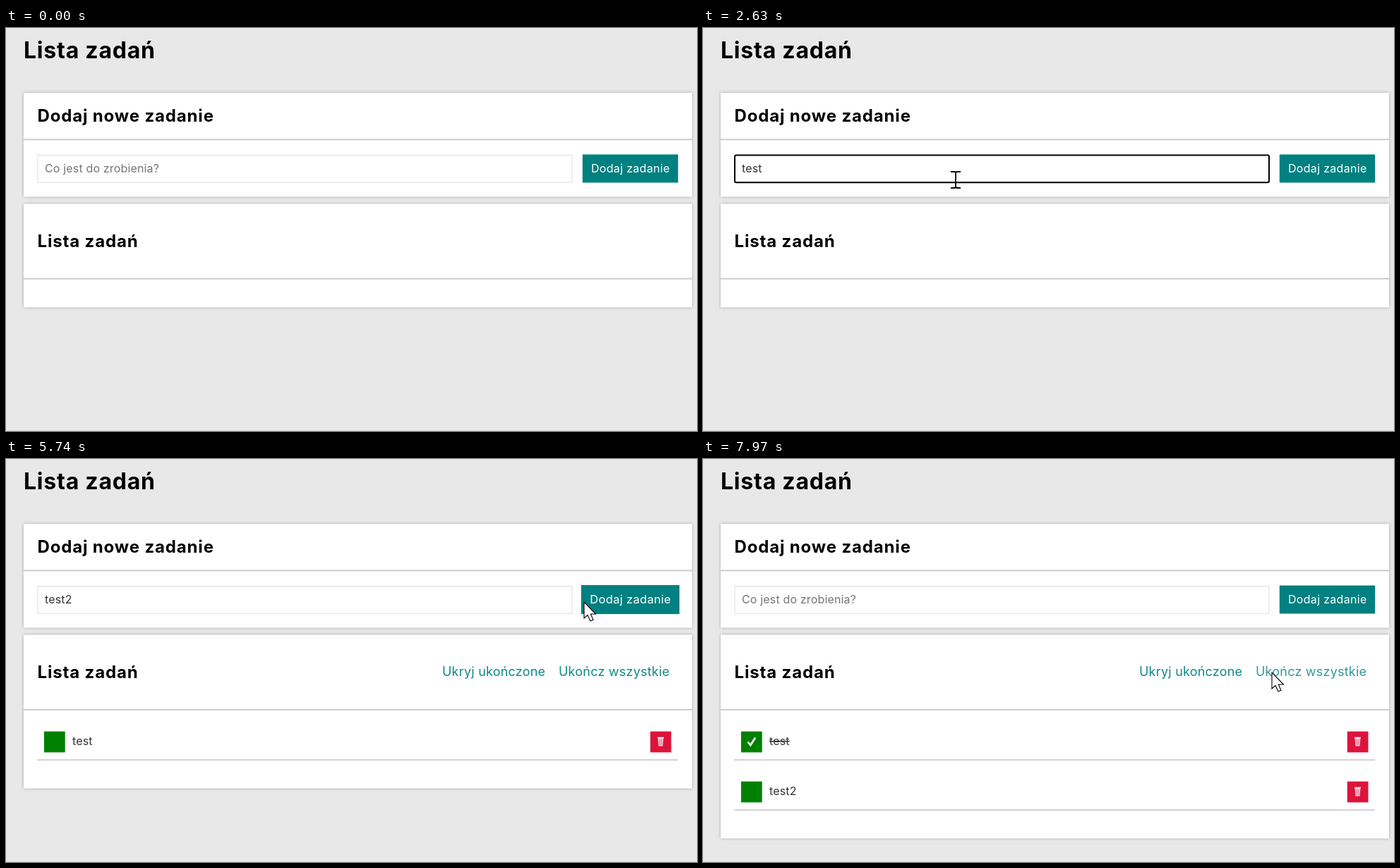
These frames come from a looping animation (979 px wide and 572 px high, 8000 ms). An HTML page:

```html
<!DOCTYPE html>
<html lang="pl">
<head>
<meta charset="utf-8">
<title>Lista zadań</title>
<style>
  html, body { margin: 0; width: 100%; height: 100%; overflow: hidden; background: #e8e8e8; }
  svg { display: block; }
  text { font: 400 16px Montserrat, Inter, sans-serif; fill: #333; letter-spacing: .01em; }
  .h1 { font-size: 32px; letter-spacing: .024em; }
  .h2 { font-size: 24px; letter-spacing: .035em; }
  .h1, .h2 { font-weight: 700; fill: #000; }
  .panel { fill: #fff; filter: drop-shadow(0 0 2px #0004); }
  .rule { fill: #ccc; }
  .link { font-size: 18px; fill: #0f8888; letter-spacing: .012em; }
  #add { transform-origin: 884.5px 199.5px; }
  #add text { fill: #fff; letter-spacing: .02em; }
  #field { fill: #fff; stroke: #ddd; }
  #field.focus { stroke: #000; stroke-width: 2px; rx: 2px; }
</style>
</head>
<body>
<svg width="979" height="572" viewBox="0 0 979 572">
  <defs>
    <g id="row">
      <rect x="54" y="386.7" width="29.7" height="29.7" fill="#008000"/>
      <rect x="912.8" y="386.7" width="29.7" height="29.7" fill="#dc143c"/>
      <path d="M923.5 396l1 11.500h6l1-11.500z" fill="#f3c5cd"/>
      <path d="M923 395.500h9" stroke="#fff" stroke-width="1.500"/>
      <path d="M926.300 398v8M928.800 398v8" stroke="#d8506a" stroke-width=".8"/>
      <rect class="rule" x="44" y="426.300" width="908" height="1.700"/>
    </g>
  </defs>
  <rect y="571" width="979" height="1" fill="#dcdcdc"/>
  <text class="h1" x="25" y="42.500">Lista zadań</text>

  <rect class="panel" x="25" y="92" width="947" height="147.500"/>
  <rect class="rule" x="25" y="157.300" width="947" height="2"/>
  <text class="h2" x="44.500" y="133">Dodaj nowe zadanie</text>
  <rect id="field" x="45" y="180.500" width="757" height="38.700"/>
  <text id="value" x="55" y="204.500"></text>
  <rect id="caret" y="190" width="1.200" height="19"/>
  <g id="add">
    <rect x="816.800" y="179.500" width="135.400" height="40" fill="#008080"/>
    <text x="884.800" y="204.500" text-anchor="middle">Dodaj zadanie</text>
  </g>

  <rect id="list" class="panel" x="25" y="249.500" width="947"/>
  <rect class="rule" x="25" y="354.800" width="947" height="2"/>
  <text class="h2" x="44.500" y="310.500">Lista zadań</text>
  <g id="row1">
    <text class="link" x="618" y="308">Ukryj ukończone</text>
    <text class="link" id="all" x="783" y="308">Ukończ wszystkie</text>
    <use href="#row"/>
    <text id="task" x="94" y="406">test</text>
    <path id="check" d="M63.500 401.500l3.800 4.800 6.800-10.800" fill="none" stroke="#fff" stroke-width="2.600"/>
  </g>
  <g id="row2" transform="translate(0 71)">
    <use href="#row"/>
    <text x="94" y="406">test2</text>
  </g>

  <g id="pointer">
    <circle id="glow" cx="-2" cy="-1" r="18" fill="#fffa3c" fill-opacity=".65"/>
    <path id="arrow" d="M0 0V23L5 18.500 9 27 13 25.300 9.300 17H16.500z" fill="#fff" stroke="#000" stroke-width="1.100"/>
    <path id="beam" d="M-7-11h5q2 0 2 2V10q0 2-2 2h-5M7-11H2q-2 0-2 2V10q0 2 2 2h5" fill="none" stroke="#000" stroke-width="1.800"/>
  </g>
</svg>
<script>
const LOOP = 8000, BLINK = 530;
const ENTER = 200, FOCUS = 740, SUBMIT = 2700, PRESS = 5730, ADD = 5870, CHECK = 6830;
const $ = id => document.getElementById(id);
const show = (id, on) => { $(id).style.display = on ? '' : 'none'; };
const within = (t, a, b) => t >= a && t < b;
const ease = (t, a, b) => {
  const p = Math.min(1, Math.max(0, (t - a) / (b - a)));
  return p * p * (3 - 2 * p);
};

// One entry per keystroke: [time, field text]
const type = (word, start, gap) =>
  [...word].map((_, i) => [start + i * gap, word.slice(0, i + 1)]);

const edits = [
  [0, ''], [FOCUS, ''], ...type('test', 1680, 130),
  [SUBMIT, ''], ...type('test2', 3550, 170),
  [ADD, '']
];

// Pointer moves: [start, end, x, y]
const moves = [
  [ENTER, 690, 351, 213],
  [950, 1020, 358, 215],
  [4830, 5670, 819, 203],
  [ADD, 6130, 428, 364],
  [6150, 6700, 66, 403],
  [6970, 7960, 806, 303]
];

function drawField(t) {
  const [since, text] = edits.findLast(e => e[0] <= t);
  const focus = within(t, FOCUS, PRESS) || within(t, ADD, CHECK - 70);
  $('field').classList.toggle('focus', focus);
  $('value').textContent = text || 'Co jest do zrobienia?';
  $('value').style.fill = text ? '' : '#757575';
  show('caret', focus && Math.floor((t - since) / BLINK) % 2 === 0);
  $('caret').setAttribute('x', 55 + (text ? $('value').getComputedTextLength() : 0));
}

function drawList(t) {
  const count = (t >= SUBMIT) + (t >= ADD), done = t >= CHECK;
  $('list').setAttribute('height', 147 + 71 * count);
  show('row1', count > 0);
  show('row2', count > 1);
  show('check', done);
  $('task').style.textDecoration = done ? 'line-through' : '';
}

function drawPointer(t) {
  let x = 400, y = 526;
  for (const [start, end, toX, toY] of moves) {
    const p = ease(t, start, end);
    x += (toX - x) * p;
    y += (toY - y) * p;
  }
  const inField = within(x, 44, 802) && within(y, 180, 220);
  show('pointer', t >= ENTER);
  show('beam', inField);
  show('arrow', !inField);
  show('glow', [FOCUS, ADD - 70, CHECK].some(click => within(t, click, click + 80)));
  $('pointer').setAttribute('transform', `translate(${x} ${y})`);

  const hover = ease(t, 5670, 5870) - ease(t, 5880, 6080);
  $('add').style.transform = `scale(${1 + hover / 10})`;
  $('all').style.fill = within(x, 783, 938) && within(y, 290, 315) ? '#339999' : '';
}

const start = performance.now();
function frame(now) {
  const t = Math.max(0, now - start) % LOOP;
  drawField(t);
  drawList(t);
  drawPointer(t);
  requestAnimationFrame(frame);
}
frame(start);
</script>
</body>
</html>
```
